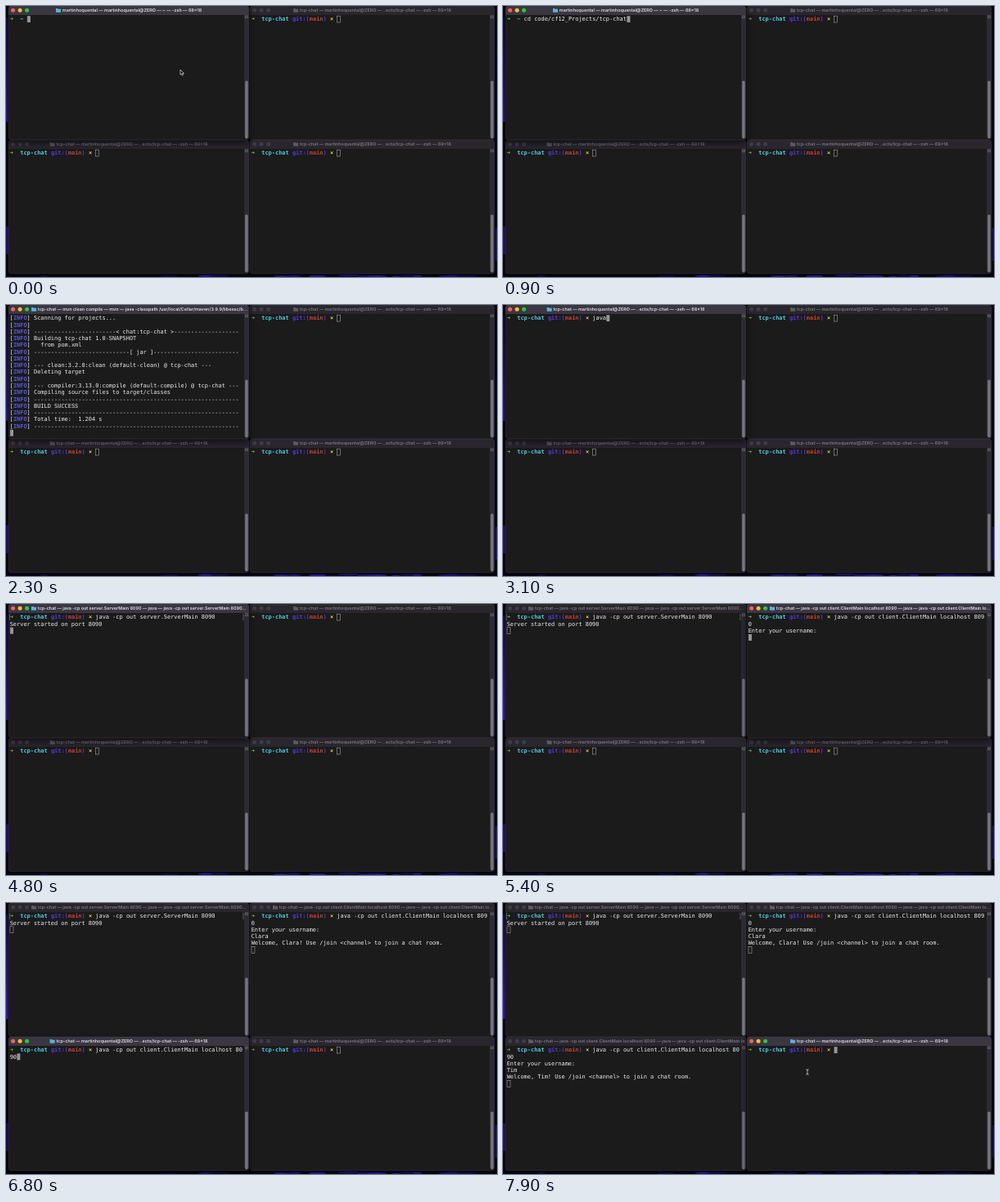
An HTML page that plays this animation: 600x332 px, repeating every 8 s.

```html
<!DOCTYPE html>
<html lang="en">
<head>
<meta charset="utf-8">
<title>TCP chat terminals</title>
<style>
  html, body { margin: 0; width: 100%; height: 100%; overflow: hidden; background: #06050f; }
  svg { display: block; width: 600px; height: 332px; }
  text { white-space: pre; text-rendering: geometricPrecision; }
  .term { font: 6.95px "DejaVu Sans Mono", monospace; fill: #ececec; }
  .g, .c, .b, .r, .y, .i { font-weight: bold; }
  .g { fill: #86cc1e; }
  .c { fill: #4cc8dc; }
  .b { fill: #5638d8; }
  .r { fill: #c8402c; }
  .y { fill: #d6cf48; }
  .i { fill: #5a5ae0; }
  .title { font: 600 5.42px Inter, sans-serif; fill: #7b7780; }
  .focus .title { fill: #dedce1; }
  .bar { fill: #29262e; }
  .focus .bar { fill: #3a3742; }
  .light { fill: #403c44; }
  .focus .light:nth-of-type(1) { fill: #ff5f57; }
  .focus .light:nth-of-type(2) { fill: #febc2e; }
  .focus .light:nth-of-type(3) { fill: #28c840; }
  .folder { fill: #5d5a62; }
  .focus .folder { fill: #58b4dc; }
  .back { fill: #1b1b1b; }
  .focus .back { filter: drop-shadow(0 4px 5px rgba(0, 0, 0, .6)); }
  .cursor { fill: none; stroke: #a0a0a0; stroke-width: .6; }
  .focus .cursor { fill: #969696; stroke: none; }
  .mark { fill: none; stroke: #858585; stroke-width: .6; }
</style>
</head>
<body>
<svg viewBox="0 0 600 332">
  <linearGradient id="glow" x1="0" y1="0" x2="0" y2="1">
    <stop offset="0" stop-color="#120b48"/><stop offset="1" stop-color="#2e1cb8"/>
  </linearGradient>
  <g id="desk"></g>
  <g id="panes"></g>
  <path id="arrow" d="M0 0v6.2l1.5-1.3 1 2.2 1-.5-1-2.1h2z" fill="#111" stroke="#fff" stroke-width=".6"/>
  <path id="beam" d="M-1.6-3.2q1.6 0 1.6 1q0-1 1.6-1M0-2.4v4.8M-1.6 3.2q1.6 0 1.6-1q0 1 1.6 1" fill="none" stroke="#e0e0e0" stroke-width=".8"/>
</svg>
<script>
const LOOP = 8000, STEP = 100;
const CW = 4.184, RH = 8.27, ROWS = 18, TOP = 12;
const USER = 'martinhoquental', HOST = 'ZERO';
const $ = id => document.getElementById(id);
const clamp = (v, a, b) => Math.min(b, Math.max(a, v));
const esc = s => s.replace(/&/g, '&amp;').replace(/</g, '&lt;');

// Desktop showing around the windows
let seed = 7;
const rnd = () => (seed = seed * 16807 % 2147483647) / 2147483647;
const rect = (x, y, w, h, fill) => `<rect x="${x}" y="${y}" width="${w}" height="${h}" fill="${fill}"/>`;
let desk = rect(0, 14, 2.4, 128, 'url(#glow)') + rect(0, 270, 3, 34, '#1a1068') + rect(598, 272, 2, 40, '#1a1068');
for (let i = 0; i < 22; i++) {
  const fill = ['#120b48', '#1a1068', '#25178e'][i % 3];
  desk += `<ellipse cx="${rnd() * 600}" cy="${330 + rnd() * 2.5}" rx="${4 + rnd() * 13}" ry="${.8 + rnd() * .8}" fill="${fill}"/>`;
}
$('desk').innerHTML = desk;

// Windows
const panes = [[3, 0, 294, 68], [298, 0, 299, 69], [3, 164, 294, 68], [298, 164, 299, 69]]
  .map(([x, y, w, cols]) => {
    const el = document.createElementNS('http://www.w3.org/2000/svg', 'g');
    el.setAttribute('transform', `translate(${x} ${y})`);
    const lights = [0, 1, 2].map(i => `<circle class="light" cx="${5.6 + 8.5 * i}" cy="5.3" r="2.5"/>`).join('');
    el.innerHTML = `
      <rect class="back" width="${w}" height="164" rx="3.5"/>
      <g><path class="bar" d="M0 11V3.5Q0 0 3.5 0H${w - 3.5}Q${w} 0 ${w} 3.5V11z"/>
        ${lights}<path class="folder" d="M0 .6h2.2l.7.8H6V5.4H0z"/><text class="title" y="7.2"></text></g>
      <rect x="${w - 6}" y="11" width="6" height="150" fill="#2c2a32"/>
      <path d="M${w - 4.6} 11.8h3.2v3h-3.2zm0 1.5h3.2" fill="none" stroke="#77757a" stroke-width=".6"/>
      <rect x="${w - 4.8}" y="91.5" width="3.5" height="71" rx="1.7" fill="#77757c"/>
      <rect x=".2" y=".2" width="${w - .4}" height="163.6" rx="3.5" fill="none" stroke="#3c3942" stroke-width=".4"/>
      <g class="term"></g>`;
    $('panes').append(el);
    const q = s => el.querySelector(s);
    return { el, w, cols, title: q('.title'), folder: q('.folder'), term: q('.term') };
  });

// A line is a list of [class, text] runs
const plain = s => [['w', s]];
const prompt = cmd => [['g', '➜  '], ['c', 'tcp-chat '], ['b', 'git:('], ['r', 'main'], ['b', ') '], ['y', '× '], ['w', cmd]];
const home = cmd => [['g', '➜  '], ['c', '~ '], ['w', cmd]];
const done = line => Object.assign(line, { mark: true });
const info = s => [['w', '['], ['i', 'INFO'], ['w', '] ' + s]];
const typed = (s, t, a, b) => s.slice(0, Math.round(s.length * clamp((t - a) / (b - a), 0, 1)));

const dash = n => '-'.repeat(n);
const build = [
  'Scanning for projects...', '', dash(24) + '< chat:tcp-chat >' + dash(19), 'Building tcp-chat 1.0-SNAPSHOT',
  '  from pom.xml', dash(28) + '[ jar ]' + dash(25), '', '--- clean:3.2.0:clean (default-clean) @ tcp-chat ---',
  'Deleting target', '', '--- compiler:3.13.0:compile (default-compile) @ tcp-chat ---',
  'Compiling source files to target/classes', dash(60), 'BUILD SUCCESS', dash(60),
  'Total time:  1.204 s', dash(60)
].map(info);

const CD = 'cd code/cf12_Projects/tcp-chat', MVN = 'mvn clean compile';
const SERVER = 'java -cp out server.ServerMain 8090';
const CLIENT = 'java -cp out client.ClientMain localhost 8090';
const shell = cols => `tcp-chat — ${USER}@${HOST} — ..ects/tcp-chat — -zsh — ${cols}×18`;
const serverTitle = `tcp-chat — ${SERVER} — java — ${SERVER}...`;
const clientTitle = `tcp-chat — ${CLIENT} — java — ${CLIENT.slice(0, 33)}...`;
const mvnTitle = 'tcp-chat — mvn clean compile — mvn — java -classpath /usr/local/Cellar/maven/3.9.9/libexec/b...';

function serverPane(t) {
  if (t < 1000) return { title: `${USER} — ${USER}@${HOST} — ~ — -zsh — 68×18`, lines: [home(typed(CD, t, 0, 900))] };
  const start = done(home(CD));
  if (t < 1800) return { title: shell(68), lines: [start, prompt(typed(MVN, t, 1000, 1700))] };
  const run = [start, done(prompt(MVN))];
  if (t < 2400) {
    const n = Math.floor(build.length * clamp((t - 1800) / 500, 0, 1));
    return { title: mvnTitle, lines: [...run, ...build.slice(0, n), plain('')] };
  }
  if (t < 2800) return { title: shell(68), lines: [...run, ...build, prompt(typed('clear', t, 2400, 2700))] };
  if (t < 4700) {
    const cmd = t < 2900 ? '' : t < 3100 ? 'j' : 'java' + typed(SERVER.slice(4), t, 3100, 4600);
    return { title: shell(68), lines: [prompt(cmd)] };
  }
  const out = t < 4800 ? [] : [plain('Server started on port 8090')];
  return { title: serverTitle, lines: [done(prompt(SERVER)), ...out, plain('')] };
}

// Times: command recalled, run, asked, name typed from/to, welcomed
function clientPane(t, cols, name, [recall, run, ask, from, to, hello]) {
  if (t < run) return { title: shell(cols), lines: [prompt(t < recall ? '' : CLIENT)] };
  const lines = [prompt(CLIENT)];
  if (t >= ask) lines.push(plain('Enter your username:'));
  lines.push(plain(typed(name, t, from, to)));
  if (t >= hello) lines.push(plain(`Welcome, ${name}! Use /join <channel> to join a chat room.`), plain(''));
  return { title: clientTitle, lines };
}

const scene = t => [
  serverPane(t),
  clientPane(t, 69, 'Clara', [5200, 5300, 5300, 5400, 5900, 6000]),
  clientPane(t, 68, 'Tim', [6600, 6900, 7000, 7000, 7300, 7400]),
  { title: shell(69), lines: [prompt('')] }
];

function wrap(lines, cols) {
  const rows = [];
  for (const line of lines) {
    let col = 0, row = { runs: [], mark: line.mark };
    rows.push(row);
    for (let [cls, s] of line) while (s) {
      if (col === cols) { rows.push(row = { runs: [] }); col = 0; }
      const part = s.slice(0, cols - col);
      row.runs.push([cls, part, col]);
      col += part.length;
      s = s.slice(part.length);
    }
    row.end = col;
  }
  return rows.slice(-ROWS);
}

function drawPane(p, { title, lines }) {
  if (p.title.textContent !== title) {
    p.title.textContent = title;
    const long = title.endsWith('...');
    const x = long ? 35.8 : p.w / 2 + 4 - p.title.getComputedTextLength() / 2;
    p.title.setAttribute('x', x);
    p.folder.setAttribute('transform', `translate(${x - 7.8} 2.3)`);
  }
  const rows = wrap(lines, p.cols);
  let out = '';
  rows.forEach((row, i) => {
    const y = TOP + i * RH;
    if (row.mark) out += `<path class="mark" d="M2.4 ${y + .8}h-1v6.6h1M${p.w - 8} ${y + .8}h1v6.6h-1"/>`;
    for (const [cls, s, col] of row.runs)
      out += `<text class="${cls}" x="${1.7 + col * CW}" y="${y + 6.3}">${esc(s)}</text>`;
  });
  const last = rows.length - 1;
  out += `<rect class="cursor" x="${2 + rows[last].end * CW}" y="${TOP + .2 + last * RH}" width="${CW - .2}" height="${RH - .4}"/>`;
  p.term.innerHTML = out;
}

// The focused window comes to the front
let front = -1;
function focus(i) {
  if (i === front) return;
  front = i;
  panes.forEach((p, k) => p.el.classList.toggle('focus', k === i));
  $('panes').append(panes[i].el);
}

// Pointer trips: shown from, shown until, start x, y, end x, y
const trips = [
  [0, 200, 213, 78, 213, 78],
  [4900, 5200, 213, 78, 370, 75],
  [6100, 6500, 370, 75, 200, 215],
  [7700, 8000, 200, 215, 372, 207]
];
function drawPointer(t, beam) {
  const trip = trips.find(([a, b]) => t >= a && t < b);
  $('arrow').style.display = trip && !beam ? '' : 'none';
  $('beam').style.display = trip && beam ? '' : 'none';
  if (!trip) return;
  const [a, b, x0, y0, x1, y1] = trip;
  const k = clamp((t - a) / (b - a - STEP), 0, 1), e = k * k * (3 - 2 * k);
  $(beam ? 'beam' : 'arrow').setAttribute('transform', `translate(${x0 + (x1 - x0) * e} ${y0 + (y1 - y0) * e})`);
}

let shown = -1;
function draw(now) {
  const t = Math.floor(now % LOOP / STEP) * STEP;
  if (t === shown) return;
  shown = t;
  const active = t < 5100 ? 0 : t < 6400 ? 1 : t < 7800 ? 2 : 3;
  focus(active);
  scene(t).forEach((s, i) => drawPane(panes[i], s));
  drawPointer(t, active === 3);
}

const begin = performance.now();
function tick() {
  draw(performance.now() - begin);
  requestAnimationFrame(tick);
}
tick();
</script>
</body>
</html>
```
